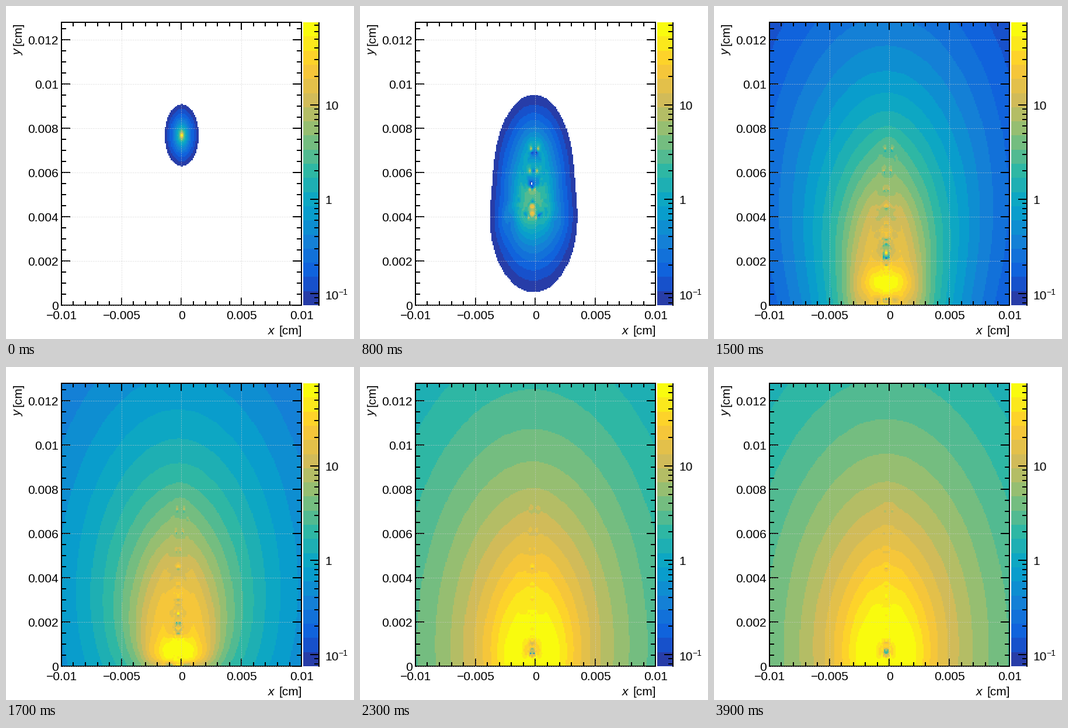
Animation of 596 by 572 pixels, one loop 4 s. Source, as a matplotlib script:

```python
import numpy as np
import matplotlib.pyplot as plt
from matplotlib.animation import FuncAnimation

W, H, DPI = 596, 572, 100
FRAMES, INTERVAL = 40, 100
# plot margins as fractions of the stage
LEFT, RIGHT, TOP, BOTTOM = 0.16 * W, 0.85 * W, 0.05 * H, 0.9 * H
L, R, T, B = (int(v) for v in (LEFT, RIGHT, TOP, BOTTOM))
PX = 72 / DPI                       # one pixel in points

# ---------------------------------------------------------------- palette
LEVELS = 20
Z_MIN, DECADES = 0.0749, 3
RED = [.2082, .0592, .0780, .0232, .1802, .5301, .8186, .9956, .9764]
GREEN = [.1664, .3599, .5041, .6419, .7178, .7492, .7328, .7862, .9832]
BLUE = [.5293, .8684, .8385, .7914, .6425, .4662, .3499, .1968, .0539]


def make_palette():
    pos = np.floor((np.arange(LEVELS) + 0.99) * 255 / LEVELS) / 254
    stops = np.linspace(0, 1, 9)
    rgb = [np.interp(pos, stops, c) for c in (RED, GREEN, BLUE)]
    colours = np.rint(np.array(rgb).T * 255)
    # the last entry (index -1) is for empty cells
    return np.vstack([colours, [[255, 255, 255]]]).astype(np.uint8)


PALETTE = make_palette()

# -------------------------------------------- avalanche, lengths in 10 um
NX, NY, DX, DY = 200, 256, 0.1, 0.05
START, LOG_TOTAL, COULOMB = 7.68, 7.75, 0.147
COUNT = int(np.exp(LOG_TOTAL))
DEPTHS = np.array([0, .15, .35, .6, .9, 1.3, 2.0])
PHI = (np.arange(16) + 0.5) * np.pi / 8
SHAPE = (2 * NY, 2 * NX)


def front(t):
    """Height of the electron cloud; it slows down at the bottom plane."""
    gap = START - 0.35 * t - 0.0072 * t * t
    return 0.6 * np.logaddexp(0, gap / 0.6)


rng = np.random.default_rng(7)
times = np.linspace(0, 40, 2000)
born = np.interp(np.log(np.arange(COUNT) + 1), LOG_TOTAL - front(times), times)
spread = rng.normal(size=(2, COUNT))
ring = 0.27 * rng.rayleigh(size=COUNT)
straggler = (rng.random(COUNT) < 0.015) * rng.exponential(8, COUNT)
gone = np.maximum(born, rng.normal(19.3, 2.85, COUNT) + straggler)
shift = -np.rint(np.minimum(3, 0.4 * born)).astype(int)

ion_y = np.abs(front(born) + 0.08 * np.sqrt(born) * spread[0])
ion_r = np.sqrt(born) * ring


def deposit(y, r, centre, charge):
    """Spread each charge over a ring and sort it into depth layers."""
    col = NX // 2 + centre[:, None] + np.rint(r[:, None] * np.cos(PHI) / DX).astype(int)
    row = np.broadcast_to((y / DY).astype(int)[:, None], col.shape)
    depth = np.abs(r[:, None] * np.sin(PHI))
    layer = np.digitize(depth, (DEPTHS[1:] + DEPTHS[:-1]) / 2)
    ok = (col >= 0) & (col < NX) & (row < NY)
    cell = ((layer * NY + row) * NX + col)[ok]
    grid = np.bincount(cell, minlength=len(DEPTHS) * NY * NX)
    return charge / len(PHI) * grid.reshape(len(DEPTHS), NY, NX)


def make_kernels():
    dy = (np.fft.fftfreq(SHAPE[0]) * SHAPE[0] * DY)[None, :, None]
    dx = ((np.fft.fftfreq(SHAPE[1]) * SHAPE[1] + 0.5) * DX)[None, None, :]
    cube = (dx**2 + dy**2 + DEPTHS[:, None, None]**2) ** 1.5
    return [np.fft.rfft2(COULOMB * d / cube) for d in (dx, dy)]


KERNELS = make_kernels()


def field_levels(t):
    ions = (born <= t) & (np.arange(COUNT) > 0)
    free = (born <= t) & (gone > t)
    lead = 1 - 0.4 * min(1, (t / 15) ** 4)
    y = np.abs(front(t) * lead + 0.13 * np.sqrt(t) * spread[1])
    r = np.sqrt(t) * ring
    charge = deposit(ion_y[ions], ion_r[ions], shift[ions], 1)
    charge += deposit(y[free], r[free], shift[free], -1)
    freq = np.fft.rfft2(charge, s=SHAPE)
    ex, ey = (np.fft.irfft2((freq * k).sum(0), s=SHAPE)[:NY, :NX] for k in KERNELS)
    size = np.maximum(np.hypot(ex, ey), 1e-9)
    level = np.floor(np.log10(size / Z_MIN) * LEVELS / DECADES).astype(int)
    return np.clip(level, -1, LEVELS - 1)


# ------------------------------------------------------------------ stage
fig = plt.figure(figsize=(W / DPI, H / DPI), dpi=DPI, facecolor="white")
ax = fig.add_axes([0, 0, 1, 1])


def raster(data, extent, origin="lower", z=1):
    return ax.imshow(data, extent=extent, origin=origin, zorder=z,
                     interpolation="nearest", aspect="auto")


# half a pixel back, so that cell edges round down
picture = raster(PALETTE[field_levels(0)],
                 (LEFT - 0.5, RIGHT - 0.5, BOTTOM - 0.5, TOP - 0.5))
raster(PALETTE[np.arange(LEVELS)][:, None], (509, 536, B, T))


def x_px(x):
    return int(LEFT + (x + 10) * (RIGHT - LEFT) / 20)


def y_px(y):
    return int(BOTTOM - y * (BOTTOM - TOP) / 12.8)


def hline(y, x0, x1, z=3):
    ax.hlines(y, x0, x1, color="black", lw=2 * PX, zorder=z, antialiased=False)


def vline(x, y0, y1, z=3):
    ax.vlines(x, y0, y1, color="black", lw=2 * PX, zorder=z, antialiased=False)


def label(x, y, s, size=21, ha="center", **kw):
    ax.text(x, y, s, fontsize=size * PX, family="Liberation Sans",
            ha=ha, va="baseline", zorder=6, **kw)


def number(v):
    return f"{v:g}".replace("-", "\u2212")


# dotted grid: one pixel in three
dots = np.zeros((H, W, 4), np.uint8)
DOT = (204, 204, 204, 255)

for y in (T, B):
    hline(y, L - 1, R + 1)
for x in (L, R):
    vline(x, T - 1, B + 1, z=5)

for i in range(-10, 11):
    x, major = x_px(i), i % 5 == 0
    size = 13 if major else 7
    vline(x, B - size, B)
    vline(x, T, T + size, z=5)
    if major:
        label(x + 0.5, 538.5, number(i / 1000))
        if abs(i) < 10:
            dots[B:T:-3, x] = DOT

for i in range(26):
    y, major = y_px(i / 2), i % 4 == 0
    size = 15 if major else 8
    hline(y, L, L + size)
    hline(y, R - size, R, z=5)
    if major:
        label(89.5, y + 7.5, number(i / 2000), ha="right")
        dots[y, L:R:3] = DOT

raster(dots, (0, W, H, 0), origin="upper", z=4)

# colour scale
vline(536, T, B + 1)
for decade in (-2, -1, 0, 1):
    for m in range(1, 10):
        value = m * 10.0 ** decade
        y = BOTTOM - np.log10(value / Z_MIN) * (BOTTOM - TOP) / DECADES
        if TOP <= y <= BOTTOM:
            hline(int(y), 536 - (15 if m == 1 else 8), 536)

label(546.5, 177.5, "10", ha="left")
label(546.5, 339.5, "1", ha="left")
label(546.5, 503.5, "10", ha="left")
label(569, 495.5, "\u22121", size=14, ha="left")

# axis titles
label(449, 564, "x", ha="left", style="italic")
label(507, 564, "[cm]", ha="right")
turned = dict(rotation=90, rotation_mode="anchor")
label(26, 85, "y", ha="left", style="italic", **turned)
label(26, 28, "[cm]", ha="right", **turned)

ax.set_xlim(0, W)
ax.set_ylim(H, 0)
ax.axis("off")


def update(frame):
    picture.set_data(PALETTE[field_levels(frame)])
    return [picture]


anim = FuncAnimation(fig, update, frames=FRAMES, interval=INTERVAL,
                     init_func=lambda: [picture], repeat=True, repeat_delay=0)
plt.show()
```
